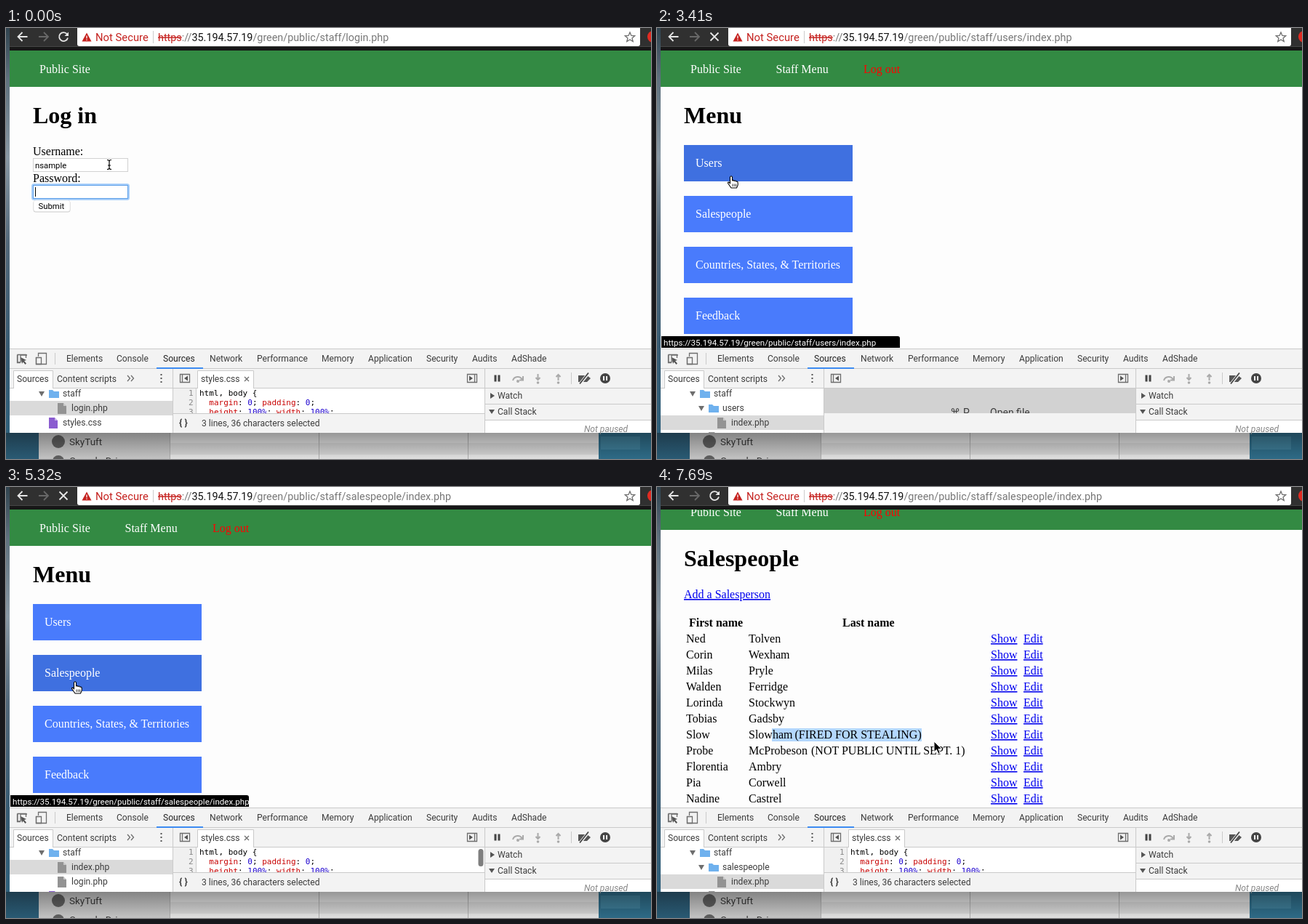
Animation of 887x593 px, one loop 7990 ms. Source, as an HTML page:

```html
<!DOCTYPE html>
<html lang="en">
<head>
<meta charset="utf-8">
<title>Staff area walkthrough</title>
<style>
html, body { margin: 0; width: 100%; height: 100%; overflow: hidden; background: #fff; }
svg { display: block; width: 887px; height: 593px; }
text { white-space: pre; }
.ui { font: 12.1px Roboto, "Open Sans", sans-serif; fill: #3c3c3c; }
.url { font-size: 14.35px; }
.form { font-size: 11.3px; fill: #000; }
.serif { font: 16px "Liberation Serif", "Noto Serif", serif; }
.mono { font: 11px "DejaVu Sans Mono", "Liberation Mono", monospace; }
.h1 { font-size: 32px; font-weight: bold; }
.bold { font-weight: bold; }
.link { fill: #0000ee; text-decoration: underline; }
.prop { fill: #c80000; }
.num { fill: #1c00cf; }
.line { fill: none; stroke: #6e6e6e; stroke-width: 1.3; }
</style>
</head>
<body>
<svg viewBox="0 0 887 593">
  <defs>
    <linearGradient id="wall" x2="0" y2="1">
      <stop offset="0" stop-color="#30434f"/><stop offset=".12" stop-color="#60727f"/>
      <stop offset=".3" stop-color="#8998a4"/><stop offset=".5" stop-color="#53687a"/>
      <stop offset=".75" stop-color="#385b73"/><stop offset="1" stop-color="#2d627e"/>
    </linearGradient>
    <linearGradient id="shade" x2="0" y2="1">
      <stop offset="0" stop-opacity=".38"/><stop offset="1" stop-opacity=".08"/>
    </linearGradient>
    <clipPath id="view"><path d="M5 31H887V441H5z"/></clipPath>
    <clipPath id="treeClip"><path d="M5 496H229V557H5z"/></clipPath>
    <clipPath id="codeClip"><path d="M230 496H658V530H230z"/></clipPath>
  </defs>

  <!-- desktop and file window behind the browser -->
  <path fill="url(#wall)" d="M0 0H887V593H0z"/>
  <path fill="#327492" d="M815 557H887V593H815z"/>
  <path fill="#4285a1" d="M818 562H872V580H818z"/>
  <path fill="#d4d4d4" d="M45 557H225V593H45z"/>
  <path fill="#f3f3f3" d="M225 557H815V593H225z"/>
  <path fill="#e4e4e4" d="M225 571H815V587H225z"/>
  <path stroke="#b9b9b9" d="M225.5 557V593M430.5 557V593M635.5 557V593"/>
  <g class="ui" style="font-size:13.5px">
    <circle cx="72" cy="569" r="9" fill="#666"/><circle cx="72" cy="596" r="8" fill="#666"/>
    <text x="87" y="574">SkyTuft</text><text x="87" y="600">Cumulo Drive</text>
  </g>
  <path fill="url(#shade)" d="M0 557H887V593H0z"/>

  <!-- browser toolbar -->
  <path fill="#303030" d="M5 0H887V26H5z"/>
  <path fill="#171717" d="M5 26H887V31H5z"/>
  <path fill="#474747" d="M5 25H887V26H5z"/>
  <path fill="#fff" d="M98 0H872V22Q872 25 869 25H101Q98 25 98 22z"/>
  <circle cx="890" cy="12" r="8" fill="#e22b22"/>
  <path fill="#c5221f" d="M111 6.5L117.5 18.5H104.5z"/>
  <path stroke="#fff" stroke-width="1.3" d="M111 10.5V14.5M111 15.7V17"/>
  <text class="ui" style="font-size:14.8px;fill:#c5221f" x="123" y="17.5">Not Secure</text>
  <path stroke="#ccc" d="M202.5 4V21"/>
  <path class="line" stroke="#555" d="M858 6l1.9 4.4 4.8.4-3.7 3.1 1.2 4.7-4.2-2.6-4.2 2.6 1.2-4.7-3.7-3.1 4.8-.4z"/>

  <!-- developer tools -->
  <path fill="#f3f3f3" d="M5 441H887V557H5z"/>
  <path fill="#fff" d="M5 496H229V557H5zM230 496H658V530H230zM659 540H887V557H659z"/>
  <path stroke="#cacaca" d="M5 441.5H887M5 468.5H887M5 495.5H887M229.5 469V557M658.5 469V557M230 530.5H658M659 517.5H887M659 539.5H887M67.5 447V463M777.5 474V490"/>
  <path fill="#3d8bf2" d="M207 467H271V469H207z"/>
  <path class="line" d="M20 460V450H29M16 450V460H20M15.5 449.5H27.5V454M15.5 449.5V460.5H20M41.5 453V462.5H49M44.5 452V447.5H55.5V462.5H49"/>
  <path class="line" d="M41.5 453.5H48.5V462.5H41.5z"/>
  <path fill="#555" d="M20 453L28 457 25 458 28 461.500 26.500 463 23.500 459.500 22 462z"/>
  <g class="ui">
    <text x="83" y="459">Elements</text><text x="152" y="459">Console</text>
    <text x="216" y="459" fill="#222">Sources</text><text x="280" y="459">Network</text>
    <text x="345" y="459">Performance</text><text x="434" y="459">Memory</text>
    <text x="498" y="459">Application</text><text x="578" y="459">Security</text>
    <text x="641" y="459">Audits</text><text x="695" y="459">AdShade</text>
    <path fill="#fff" stroke="#cacaca" d="M10.500 496V471.500H64.500V496"/>
    <text x="15" y="487">Sources</text><text x="70" y="487">Content scripts</text>
    <text x="676" y="510">Watch</text><text x="676" y="532">Call Stack</text>
    <text x="795" y="556" font-style="italic" fill="#888" style="fill:#888">Not paused</text>
    <text x="238" y="548" class="bold" style="font-size:13px">{ }</text>
  </g>
  <path class="line" d="M167 478l3.500 4-3.500 4M172 478l3.500 4-3.500 4"/>
  <path fill="#555" d="M212.500 476h2v2h-2zM212.500 481h2v2h-2zM212.500 486h2v2h-2zM666 502l6 4-6 4zM664 525h8l-4 6z"/>
  <g class="line">
    <path d="M239.500 476.500h13v11h-13zM242.500 476v12M634.500 476.500h13v11h-13zM644.500 476v12"/>
    <path fill="#555" stroke="none" d="M250 478.500v7l-5-3.500zM637 478.500v7l5-3.500z"/>
    <path stroke="#444" stroke-width="3" d="M673 477.500v9M678 477.500v9"/>
    <g stroke="#aaa" stroke-width="2">
      <path d="M697 485a7 7 0 0 1 13-1M711 479v5.500h-5M731.500 476v7M728.500 481l3 3 3-3M759.500 485v-7M756.500 480l3-3 3 3"/>
      <g fill="#aaa" stroke="none"><circle cx="704" cy="486" r="2"/><circle cx="731.500" cy="488" r="1.800"/><circle cx="759.500" cy="488" r="1.800"/></g>
    </g>
    <path fill="#555" stroke="none" d="M787 478h12l5 4-5 5h-12z"/>
    <path stroke="#f3f3f3" stroke-width="4" d="M789 490l12-15"/><path stroke="#444" stroke-width="1.800" d="M789 489.500l12-15"/>
    <circle cx="824" cy="482" r="7" fill="#444" stroke="none"/><path stroke="#fff" stroke-width="2" d="M822 479v6M826 479v6"/>
  </g>
  <g id="live"></g>
</svg>
<script>
const LOOP = 7990;
const live = document.getElementById('live');
const host = '35.194.57.19';
const root = '/green/public/staff/';

// Each entry changes part of the state from its time (ms) on.
const steps = [
  [0, { page: 'login', path: 'login.php', tree: 'login', dots: 0, focus: true, cursor: ['beam', 142, 188],
        status: '', hover: -1, loading: false, forward: false, blank: false, thumb: false, scroll: 0, mark: 0 }],
  [450, { dots: 2, cursor: null }],
  [600, { dots: 5 }],
  [750, { dots: 8 }],
  [900, { dots: 12 }],
  [1050, { cursor: ['arrow', 112, 286] }],
  [1200, { cursor: ['arrow', 65, 247] }],
  [1340, { focus: false, loading: true }],
  [1630, { path: 'index.php', status: 'Connecting…' }],
  [1930, { page: 'menu', tree: 'menu', loading: false, thumb: true }],
  [2230, { status: '' }],
  [2520, { cursor: ['hand', 70, 238], hover: 1 }],
  [2670, { cursor: ['arrow', 80, 221], hover: -1 }],
  [2820, { cursor: ['hand', 94, 208], hover: 0, thumb: false }],
  [2970, { cursor: ['hand', 100, 205], status: 'users/' }],
  [3110, { cursor: ['hand', 102, 204] }],
  [3410, { loading: true, path: 'users/index.php', tree: 'users', blank: true }],
  [3560, { page: 'users', loading: false, blank: false, thumb: true, status: '', hover: -1, cursor: ['arrow', 102, 204] }],
  [3710, { cursor: ['arrow', 90, 145] }],
  [3850, { cursor: ['arrow', 60, 75] }],
  [4000, { cursor: ['arrow', 36, 32] }],
  [4150, { cursor: ['arrow', 24, 14] }],
  [4290, { thumb: false }],
  [4590, { page: 'menu', path: 'index.php', tree: 'menu', forward: true, thumb: true }],
  [4740, { cursor: ['arrow', 66, 150] }],
  [4880, { cursor: ['hand', 95, 268], hover: 1 }],
  [5030, { status: 'salespeople/' }],
  [5180, { loading: true, forward: false, path: 'salespeople/index.php' }],
  [5330, { tree: 'salespeople', blank: true, thumb: false }],
  [5470, { page: 'salespeople', loading: false, blank: false, thumb: true, hover: -1 }],
  [5620, { cursor: ['arrow', 97, 269] }],
  [5770, { status: '', cursor: ['arrow', 210, 272] }],
  [5920, { cursor: ['arrow', 320, 280] }],
  [6070, { cursor: ['arrow', 275, 312] }],
  [6220, { cursor: ['arrow', 205, 345], thumb: false }],
  [6360, { cursor: ['beam', 165, 361] }],
  [6510, { cursor: ['beam', 158, 363] }],
  [6800, { scroll: 11, cursor: ['beam', 158, 352] }],
  [6950, { scroll: 22, cursor: ['beam', 158, 342] }],
  [7100, { mark: 42, cursor: ['beam', 200, 342] }],
  [7250, { mark: 104, cursor: ['beam', 262, 343] }],
  [7390, { mark: 164, cursor: ['beam', 322, 344] }],
  [7540, { mark: 206, cursor: ['beam', 368, 347] }],
  [7690, { cursor: ['arrow', 381, 350] }]
];
const states = [];
steps.forEach(([, change], i) => states.push({ ...states[i - 1], ...change }));

const people = [
  'Ned Tolven', 'Corin Wexham', 'Milas Pryle', 'Walden Ferridge', 'Lorinda Stockwyn', 'Tobias Gadsby',
  'Slow Slowham', 'Probe McProbeson', 'Florentia Ambry', 'Pia Corwell', 'Nadine Castrel'
].map(name => name.split(' '));

const text = (x, y, str, cls = '', fill = '') =>
  `<text x="${x}" y="${y}" class="${cls}"${fill && ` style="fill:${fill}"`}>${str}</text>`;
const box = (x, y, w, h, fill, more = '') =>
  `<rect x="${x}" y="${y}" width="${w}" height="${h}" fill="${fill}" ${more}/>`;
const path = (d, more) => `<path d="${d}" ${more}/>`;

function field(y, focused) {
  return focused
    ? box(36.500, y - .5, 132, 20, '#fff', 'rx="2" stroke="#a9cffa" stroke-width="3"') +
      box(37.500, y + .5, 130, 18, '#fff', 'stroke="#5c9fe8"')
    : box(37.500, y + .5, 130, 18, '#fff', 'stroke="#d2d2d2"');
}

function login(s) {
  let out = text(37, 131, 'Log in', 'h1') + text(37, 175, 'Username:') + text(37, 212, 'Password:') +
    field(179, false) + field(216, s.focus) + text(40, 193, 'nsample', 'ui form');
  for (let i = 0; i < s.dots; i++) out += `<circle cx="${43 + i * 6.300}" cy="226.500" r="2.300"/>`;
  if (s.focus) out += box(40 + s.dots * 6.300, 219, 1, 13, '#000');
  return out + box(37.500, 237.500, 51, 16, '#c9c9c9', 'rx="3.500"') +
    box(38, 237, 50, 15.500, '#fff', 'rx="3" stroke="#e2e2e2" stroke-width=".6"') +
    text(44.500, 249, 'Submit', 'ui form');
}

function menu(s) {
  const items = ['Users', 'Salespeople', 'Countries, States, &amp; Territories', 'Feedback'];
  return text(37, 131, 'Menu', 'h1') + items.map((item, i) =>
    box(37, 161 + i * 70, 232, 50, i === s.hover ? '#3f70e0' : '#497bfc') +
    text(53, 191 + i * 70, item, '', '#fff')).join('');
}

function salespeople(s) {
  const notes = { 6: [185.500, '(FIRED FOR STEALING)'], 7: [212, '(NOT PUBLIC UNTIL SEPT. 1)'] };
  return text(37, 131, 'Salespeople', 'h1') + text(37, 175, 'Add a Salesperson', 'link') +
    text(44, 214, 'First name', 'bold') + text(255, 214, 'Last name', 'bold') +
    box(158, 354, s.mark, 18, '#b3d7fe') +
    people.map(([first, last], i) => {
      const y = 236 + i * 22;
      const note = notes[i] ? text(notes[i][0] + (i === 6 ? 4 : 0), y, notes[i][1]) : '';
      return text(40, y, first) + text(126, y, last) + note +
        text(459, y, 'Show', 'link') + text(504, y, 'Edit', 'link');
    }).join('');
}

const pages = { login, menu, salespeople, users: () => text(37, 131, 'Users', 'h1') };

function view(s) {
  const nav = box(5, 31, 882, 50, '#338a43') + text(46, 62, 'Public Site', '', '#fff') +
    (s.page === 'login' ? '' : text(163.500, 62, 'Staff Menu', '', '#fff') + text(284, 62, 'Log out', '', '#f00'));
  return `<g clip-path="url(#view)" class="serif">${box(5, 31, 882, 410, '#fdfdfd')}
    <g transform="translate(0 ${-s.scroll})">${nav + pages[s.page](s)}</g></g>`;
}

function toolbar(s) {
  const stroke = color => `fill="none" stroke="${color}" stroke-width="1.800"`;
  const reload = path('M84 8.500a6 6 0 1 0 1 5', stroke('#e6e6e6')) + path('M86 5.500v5.500h-5.500z', 'fill="#e6e6e6"');
  return path('M29.500 12H17M22.500 6l-6 6 6 6', stroke('#e6e6e6')) +
    path('M45 12H57.500M52 6l6 6-6 6', stroke(s.forward ? '#e6e6e6' : '#686868')) +
    (s.loading ? path('M73.500 6.500l11 11M84.500 6.500l-11 11', stroke('#e6e6e6')) : reload) +
    `<text x="209" y="17.500" class="ui url" style="fill:#777"><tspan fill="#c5221f" text-decoration="line-through">https</tspan>://<tspan fill="#111">${host}</tspan>${root + s.path}</text>`;
}

function statusBar(s) {
  if (!s.status) return '';
  const label = s.status.endsWith('/') ? `https://${host}${root}${s.status}index.php` : s.status;
  return path('M6 440V424H331Q334 424 334 427V440z', 'fill="#000"') +
    `<g style="font-size:11.600px">${`<text x="9" y="436.500" class="ui" style="fill:#fff;font-size:11.600px">${label}</text>`}</g>`;
}

const folder = (x, y) => path(`M${x} ${y - 5}h5l2 2h7v9h-14z`, 'fill="#6fb1ee"');
const file = (x, y, fill) => path(`M${x} ${y - 7}h8l4 4v11h-12z`, `fill="${fill}"`) +
  path(`M${x + 8} ${y - 7}v4h4z`, 'fill="#fff" opacity=".5"');

function tree(s) {
  const rows = {
    login: ['login.php*', 'styles.css'],
    menu: ['index.php*', 'login.php'],
    users: ['users', 'index.php*'],
    salespeople: ['salespeople', 'index.php*']
  }[s.tree];
  const nested = !rows[0].includes('.');
  const twisty = (x, y) => path(`M${x - 4} ${y - 3}h8l-4 7z`, 'fill="#6e6e6e"');
  let out = twisty(49, 503) + folder(59, 503) + text(78, 507, 'staff');
  rows.forEach((row, i) => {
    const y = 523 + i * 20, name = row.replace('*', '');
    if (row !== name) out += box(5, y - 10, 224, 20, '#dadada');
    if (nested && !i) out += twisty(61, y) + folder(71, y) + text(90, y + 4, name);
    else if (name === 'styles.css') out += file(59, y, '#8a5cd0') + text(78, y + 4, name);
    else {
      const x = nested ? 83 : 71;
      out += file(x, y, '#939393') + text(x + 19, y + 4, name);
    }
  });
  if (s.tree !== 'login') out += nested ? file(71, 563, '#939393') : file(59, 563, '#8a5cd0');
  return `<g clip-path="url(#treeClip)" class="ui">${out}</g>`;
}

function editor(s) {
  if (s.blank) {
    return box(230, 496, 428, 61, '#f3f3f3') + `<g clip-path="url(#codeClip)" class="ui">` +
      box(230, 496, 428, 34, '#d2d2d2') +
      `<g style="font-size:14px"><text x="403" y="534" style="font:14px 'DejaVu Sans',sans-serif">⌘</text>
      <text x="421" y="534" style="font-size:14px">P</text><text x="458" y="534" style="font-size:14px">Open file</text></g></g>`;
  }
  const rule = (y, pairs) => `<text x="279.300" y="${y}">` + pairs.map(([prop, value]) =>
    `<tspan class="prop">${prop}</tspan>: <tspan class="num">${value}</tspan>;`).join(' ') + '</text>';
  const lines = [506, 519, 532].map((y, i) => text(251, y, i + 1, '', '#8a8a8a')).join('');
  return path('M263.500 496V471.500H340.500V496', 'fill="#fff" stroke="#cacaca"') +
    text(268, 487, 'styles.css', 'ui') + path('M328 480l6 6M334 480l-6 6', 'class="line"') +
    `<g clip-path="url(#codeClip)" class="mono">` + box(230, 496, 32, 34, '#f0f0f0') + box(261, 496, 1, 34, '#ccc') +
    lines + text(266, 506, 'html, body {') +
    rule(519, [['margin', '0'], ['padding', '0']]) + rule(532, [['height', '100%'], ['width', '100%']]) + '</g>' +
    text(269, 548, '3 lines, 36 characters selected', 'ui') +
    (s.thumb ? box(649.500, 498, 7, 24, '#7f7f7f', 'rx="3.500"') : '');
}

const cursors = {
  arrow: path('M0 0V14.500L3.400 11.400 5.800 17 8.300 16 5.900 10.500H10.400z', 'fill="#000" stroke="#fff"'),
  beam: path('M-3 -6.500Q0 -6.500 0 -4.500Q0 -6.500 3 -6.500M0 -5V5M-3 6.500Q0 6.500 0 4.500Q0 6.500 3 6.500M-2 1H2', 'fill="none" stroke="#000" stroke-width="1.200"'),
  hand: path('M-1.500 10V1Q0 -1.500 1.500 1V6Q3 4.500 4 6.500Q6 5.200 6.800 7.200Q9 6.500 9.200 9V12L7.500 16H0L-4.500 9.500Q-4.500 7 -2 9z', 'fill="#fff" stroke="#000" stroke-width="1.100" stroke-linejoin="round"') +
    path('M2 10.500v3.500M4.300 10.500v3.500M6.500 10.500v3.500', 'stroke="#000" stroke-width=".8"')
};

function pointer({ cursor }) {
  if (!cursor) return '';
  const [kind, x, y] = cursor;
  return `<g transform="translate(${x} ${y})">${cursors[kind]}</g>`;
}

let shown = -1;
function draw(now) {
  const time = now % LOOP;
  const index = steps.findLastIndex(([start]) => start <= time);
  if (index !== shown) {
    shown = index;
    live.innerHTML = [view, toolbar, statusBar, tree, editor, pointer].map(part => part(states[index])).join('');
  }
}

const begin = performance.now();
function tick() {
  draw(performance.now() - begin);
  requestAnimationFrame(tick);
}
tick();
</script>
</body>
</html>
```
